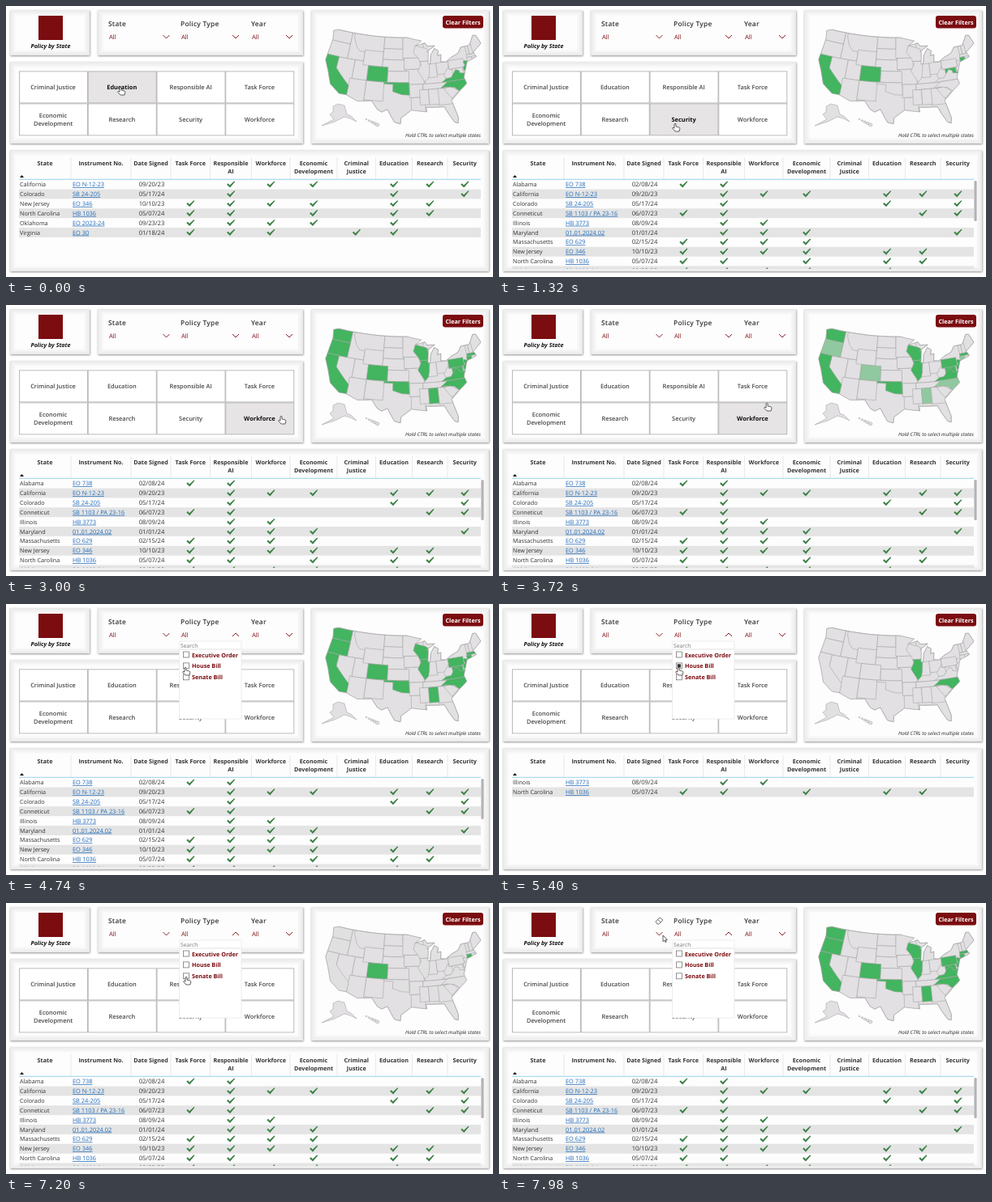
These frames come from a looping animation (600 px wide and 335 px high, 8000 ms). An HTML page:

```html
<!DOCTYPE html>
<html lang="en">
<head>
<meta charset="utf-8">
<title>Policy by State</title>
<style>
html, body { margin: 0; width: 100%; height: 100%; overflow: hidden; background: #fff; }
svg { display: block; width: 600px; height: 335px; }
text { font-family: "Open Sans", "Noto Sans", sans-serif; text-rendering: geometricPrecision; white-space: pre; }
</style>
</head>
<body>
<svg id="stage" viewBox="0 0 600 335"></svg>
<script>
const LOOP = 8000, FADE = 400;
const RED = '#7b0c10', LAND = [226, 224, 226], GREEN = [67, 180, 95];
const stage = document.getElementById('stage');

function add(tag, attrs, parent = stage) {
  const node = document.createElementNS('http://www.w3.org/2000/svg', tag);
  for (const k in attrs) node.setAttribute(k, attrs[k]);
  parent.appendChild(node);
  return node;
}
const box = (x, y, width, height, attrs, parent) => add('rect', { x, y, width, height, ...attrs }, parent);
const path = (d, attrs, parent) => add('path', { d, fill: 'none', ...attrs }, parent);
function text(str, x, y, size, attrs, parent) {
  const node = add('text', { x, y, 'font-size': size, fill: '#333', ...attrs }, parent);
  node.textContent = str;
  return node;
}
const mid = { 'text-anchor': 'middle' };
const bold = { 'font-weight': 700 };
const show = (node, on) => node.setAttribute('display', on ? 'inline' : 'none');
const mix = (a, b, f) => a + (b - a) * f;

// ---- panels ----
const defs = add('defs', {});
const blur = add('filter', { id: 'soft', x: '-10%', y: '-10%', width: '120%', height: '120%' }, defs);
add('feGaussianBlur', { stdDeviation: 1.2 }, blur);
const rowClip = add('clipPath', { id: 'rows' }, defs);
box(14, 215, 576, 110, {}, rowClip);

function panel(x, y, r, b) {
  const w = r - x, h = b - y;
  box(x + 0.5, y + 1, w, h, { fill: '#909090', filter: 'url(#soft)' });
  for (let k = 0; k < 8; k++) {
    const v = 234 + k * 2.6;
    box(x + k, y + k, w - 2 * k, h - 2 * k, { fill: `rgb(${v},${v},${v})` });
  }
  box(x + 8, y + 8, w - 16, h - 16, { fill: '#fefdfe' });
}
panel(5, 5, 103, 61);
panel(113, 5, 366, 61);
panel(5, 69, 366, 170);
panel(376, 5, 595, 170);
panel(5, 178, 595, 328);

// ---- logo place and title ----
box(40, 12, 30, 30, { fill: RED });
text('Policy by State', 55, 51.7, 7.1, { ...mid, ...bold, 'font-style': 'italic', fill: '#111' });

// ---- slicers ----
const chevron = (x, dir) => `M${x - 4} ${38 - 2 * dir}L${x} ${38 + 2 * dir}L${x + 4} ${38 - 2 * dir}`;
const [, typeChevron] = [['State', 126, 197.5], ['Policy Type', 215, 283], ['Year', 302, 349]].map(([name, x, cx]) => {
  text(name, x, 25.4, 8.4, { 'font-weight': 600, 'letter-spacing': 0.25 });
  text('All', x + 1, 41, 7.6, { fill: RED });
  return path(chevron(cx, 1), { stroke: RED, 'stroke-width': 0.9 });
});
const eraser = path('M193 23L198 18L202 21L197 26H195ZM195.5 20.5L199.5 24', { stroke: '#555', 'stroke-width': 0.8 });

// ---- topic tiles ----
const tiles = ['Criminal Justice', 'Education', 'Responsible AI', 'Task Force',
  'Economic Development', 'Research', 'Security', 'Workforce'].map((name, i) => {
  const x = 16 + (i % 4) * 84.8, y = i < 4 ? 80.5 : 120.5;
  const back = box(x + 0.4, y + 0.4, 84, 39, { stroke: '#aaa', 'stroke-width': 0.8 });
  const lines = name.startsWith('Eco') ? name.split(' ') : [name];
  const labels = lines.map((s, k) =>
    text(s, x + 42, y + 22.4 + (k - (lines.length - 1) / 2) * 9.6, 7.45, mid));
  return { x, y, back, labels };
});

// ---- map: conic projection, points as west longitude, latitude ----
const rad = Math.PI / 180;
const s1 = Math.sin(29.5 * rad), s2 = Math.sin(45.5 * rad);
const cone = (s1 + s2) / 2, C = 1 - s1 * s1 + 2 * cone * s1;
const rho = lat => Math.sqrt(C - 2 * cone * Math.sin(lat * rad)) / cone;
function project(lon, lat) {
  const a = cone * (96 - lon) * rad, r = rho(lat);
  return [491.5 + 265 * r * Math.sin(a), 92.5 - 265 * (rho(37.5) - r * Math.cos(0.93 * a))];
}
// closed shape, long sides follow the curve of the parallels
function trace(p) {
  const out = [], n = p.length;
  for (let i = 0; i < n; i += 2) {
    const lon = p[(i + 2) % n], lat = p[(i + 3) % n];
    const steps = Math.ceil(Math.abs(lon - p[i]) / 2) || 1;
    for (let k = 0; k < steps; k++)
      out.push(project(mix(p[i], lon, k / steps), mix(p[i + 1], lat, k / steps)).map(v => v.toFixed(1)).join(' '));
  }
  return 'M' + out.join('L') + 'Z';
}

const coast = trace([124.7, 48.4, 122.8, 49, 95.2, 49, 89.6, 48, 92, 46.7, 88.2, 47.4, 87.5, 46.5, 84.5, 46.4,
  87.8, 45, 87.2, 45, 87.7, 41.7, 86.9, 41.7, 86.4, 44, 84.8, 45.7, 83.4, 45, 83.9, 43.7, 82.6, 43.9, 83, 42,
  81.2, 41.8, 79, 42.8, 76.2, 43.6, 74.8, 45, 71.5, 45, 69.2, 47.4, 68, 47.2, 67, 44.8, 70.7, 43, 70, 41.7,
  73.7, 40.9, 74, 40.5, 75, 38.8, 76, 37, 75.5, 35.3, 77.9, 33.9, 81.3, 31.5, 80.1, 26.8, 80.4, 25.2, 81.4, 25.6,
  82.8, 28, 83.8, 30, 89.5, 30.3, 89.3, 29.1, 94, 29.7, 97.2, 27.6, 97.3, 26, 99.1, 26.4, 101.4, 29.8,
  103.1, 29, 104.5, 29.6, 106.5, 31.8, 111, 31.3, 114.8, 32.5, 117.1, 32.5, 120.6, 34.5, 122.5, 37.8, 124.4, 40.4, 124, 46.2]);
const edge = { stroke: '#a6a6a6', 'stroke-width': 0.6, 'stroke-linejoin': 'round' };
const land = { ...edge, fill: `rgb(${LAND})` };
path(coast, {}, add('clipPath', { id: 'coast' }, defs));
path(coast, land);
const inland = add('g', { 'clip-path': 'url(#coast)' });

// the coast trims every state and later states cover earlier ones
const shapes = {};
const state = (name, ...p) => { shapes[name] = path(trace(p), land, inland); };
const quad = (name, west, east, top, low) => state(name, west, top, east, top, east, low, west, low);

quad('Idaho', 117, 111, 49, 42);
state('Montana', 116, 49, 104, 49, 104, 45, 111, 44.5, 113, 44.5, 114.5, 45.6, 116, 48);
quad('Nevada', 120, 114, 42, 35);
quad('Utah', 114, 109, 42, 37);
quad('Arizona', 114.7, 109, 37, 31);
quad('New Mexico', 109, 103, 37, 31.9);
quad('Wyoming', 111, 104, 45, 41);
quad('North Dakota', 104, 96.8, 49, 45.9);
quad('South Dakota', 104, 96.5, 45.9, 43);
quad('Nebraska', 104, 95.8, 43, 40);
quad('Minnesota', 96.8, 89, 49, 43.5);
quad('Iowa', 96.3, 90.5, 43.5, 40.5);
quad('Missouri', 95.5, 89.5, 40.5, 36.5);
quad('Kansas', 102, 94.6, 40, 37);
quad('Arkansas', 94.5, 90, 36.5, 33);
quad('Louisiana', 94, 89.6, 33, 29);
quad('Mississippi', 91.2, 88.3, 35, 31);
quad('Kentucky', 89.3, 82, 38.9, 36.5);
quad('Tennessee', 90, 82, 36.5, 35);
quad('Indiana', 88, 84.8, 41.7, 38.1);
quad('Ohio', 84.8, 80.5, 41.8, 38.7);
quad('Georgia', 85.5, 81, 35, 30.6);
state('South Carolina', 83.3, 34.8, 81, 35.2, 78.5, 33.8, 81, 32);
state('West Virginia', 82.6, 38.4, 80.6, 40.5, 80.5, 39.7, 77.8, 39.5, 80.3, 37.4, 82, 37.4);
quad('Vermont', 73.3, 72.2, 45, 42.7);
quad('New Hampshire', 72.2, 70.9, 45.2, 42.7);
quad('Washington', 125, 117, 49, 45.9);
quad('Oregon', 125, 117, 45.9, 42);
state('California', 125, 42, 120, 42, 120, 39, 114.6, 35, 114.7, 32, 125, 32);
quad('Colorado', 109, 102, 41, 37);
state('Oklahoma', 103, 37, 94.6, 37, 94.5, 33.7, 97, 33.8, 100, 34.6, 100, 36.5, 103, 36.5);
state('Wisconsin', 92, 46.8, 88.1, 45.9, 86.5, 45, 87, 42.5, 90.6, 42.5, 91.2, 43.5, 92.8, 45);
state('Illinois', 90.6, 42.5, 87, 42.5, 87.5, 39.3, 88, 37.9, 89.2, 37, 91.4, 40, 90.2, 41.8);
quad('Alabama', 88.3, 85.2, 35, 30.9);
quad('Pennsylvania', 80.5, 75, 42, 39.7);
quad('Massachusetts', 73.4, 69, 42.7, 42);
quad('Conneticut', 73.6, 71.8, 42, 40.5);
quad('Maryland', 79.5, 75, 39.7, 38);
quad('Delaware', 75.8, 75, 39.8, 38.5);
state('New Jersey', 74.7, 41.4, 73.5, 41, 73.5, 39, 75.5, 38.8, 75.5, 39.6, 74.7, 40.2, 75.1, 40.9);
state('Virginia', 83.6, 36.55, 75, 36.55, 75, 38, 77.1, 38.4, 77.1, 39, 78.3, 39.4, 80.3, 37.5, 82, 37.4);
state('North Carolina', 84.3, 35, 81.7, 36.55, 75, 36.55, 75, 33, 78.5, 33.8, 79.7, 34.8, 82.3, 35.2);
path(coast, edge);

// Alaska and Hawaii
path('M403 124L409 121L417 123L420 134L425 136L432 143L424 139L417 137L405 143L389 148L404 140L399 134L403 131Z', land);
for (let k = 0; k < 5; k++)
  add('ellipse', { cx: 444 + k * 3.4, cy: 140 + k * 1.7, rx: 0.9 + k * 0.35, ry: 0.7 + k * 0.3, ...land });

box(538, 12, 50, 15.5, { rx: 3, fill: RED });
text('Clear Filters', 563, 22.5, 7.2, { ...mid, ...bold, fill: '#fff' });
text('Hold CTRL to select multiple states', 538.5, 162, 6.2, { ...mid, 'font-style': 'italic', fill: '#222' });

// ---- table ----
const heads = ['State', 'Instrument No.', 'Date Signed', 'Task Force', 'Responsible AI', 'Workforce',
  'Economic Development', 'Criminal Justice', 'Education', 'Research', 'Security'];
const edges = [16, 80, 154, 203, 251.5, 302.5, 350, 408, 455.5, 500.5, 544, 586.5];
const center = i => (edges[i] + edges[i + 1]) / 2;
const topicsList = heads.slice(3);
const records = [
  ['Alabama', 'EO 738', '02/08/24', '01'],
  ['California', 'EO N-12-23', '09/20/23', '123567'],
  ['Colorado', 'SB 24-205', '05/17/24', '157'],
  ['Conneticut', 'SB 1103 / PA 23-16', '06/07/23', '0167'],
  ['Illinois', 'HB 3773', '08/09/24', '12'],
  ['Maryland', '01.01.2024.02', '01/01/24', '1237'],
  ['Massachusetts', 'EO 629', '02/15/24', '0123'],
  ['New Jersey', 'EO 346', '10/10/23', '012356'],
  ['North Carolina', 'HB 1036', '05/07/24', '01356'],
  ['Oklahoma', 'EO 2023-24', '09/23/23', '01235'],
  ['Oregon', 'EO 23-26', '11/28/23', '01'],
  ['Pennsylvania', 'EO 2023-19', '09/20/23', '012'],
  ['Virginia', 'EO 30', '01/18/24', '01245'],
  ['Washington', 'EO 24-01', '01/30/24', '012'],
  ['Wisconsin', 'EO 211', '08/23/23', '02']
];
function matches([, bill, , topics], filter) {
  const col = topicsList.indexOf(filter);
  return col < 0 ? bill.startsWith(filter) || !filter : topics.includes(col);
}

heads.forEach((name, i) => {
  const wrap = ['AI', 'Development', 'Justice'].includes(name.split(' ')[1]) ? name.split(' ') : [name];
  wrap.forEach((s, k) => text(s, center(i), 197 + k * 9.8, 7.2, { ...mid, ...bold }));
  if (i) path(`M${edges[i]} 187V214`, { stroke: '#dcdcdc', 'stroke-width': 0.6 });
});
path('M17 212L19.5 209L22 212Z', { fill: '#111' });

const views = {};
function buildRows(filter) {
  const g = add('g', { 'clip-path': 'url(#rows)' });
  const list = records.filter(r => matches(r, filter));
  list.forEach(([name, bill, date, topics], i) => {
    const y = 214.7 + i * 11.87, base = y + 8.5;
    if (i % 2) box(16, y, 569, 11.87, { fill: '#e4e4e4' }, g);
    text(name, 17, base, 7.2, {}, g);
    text(bill, 82, base, 7.4, { fill: '#1f6bb8', 'text-decoration': 'underline' }, g);
    text(date, 179.5, base, 7.6, mid, g);
    for (const c of topics)
      path('M-5 .3L-3.2 -1.1L-1.3 1.2L4.2 -4L5.2 -3.2L-1 4.2Z',
        { fill: '#3c8045', transform: `translate(${center(+c + 3)} ${y + 5.7})` }, g);
  });
  if (list.length > 9) box(585.4, 216, 3.2, 50, { rx: 1.5, fill: '#b3b3b3' }, g);
  views[filter] = g;
}

// ---- timeline: filter, pressed, released, pointer place ----
const stops = [
  ['Education', -1000, 120, 141, 100],
  ['Security', 600, 1320, 217, 145],
  ['Research', 1680, 2340, 160, 141],
  ['Workforce', 3060, 3540, 339, 137],
  ['', 4200, 4260, 283, 36],
  ['HB', 4860, 5940, 221, 78],
  ['SB', 6360, 7140, 222, 91],
  ['', 8040, 8100, 202, 40]
];
const MENU_OPEN = 4200;
new Set(stops.map(s => s[0])).forEach(buildRows);
path('M16 214.3H585', { stroke: '#8fcdec', 'stroke-width': 0.9 });

// ---- policy type list ----
const menu = add('g', {});
box(213.5, 46, 76.5, 96, { fill: '#fff', stroke: '#e6e6e6', 'stroke-width': 0.7 }, menu);
text('Search', 215, 53.6, 6.8, { fill: '#777' }, menu);
path('M214 56H289', { stroke: '#d5d5d5', 'stroke-width': 0.7 }, menu);
const checks = {};
[['Executive Order', 'EO'], ['House Bill', 'HB'], ['Senate Bill', 'SB']].forEach(([name, key], i) => {
  const y = 59 + i * 13.9;
  box(218.4, y, 7, 7, { fill: '#fff', stroke: '#777', 'stroke-width': 0.8 }, menu);
  checks[key] = box(219.8, y + 1.4, 4.2, 4.2, { fill: '#333' }, menu);
  text(name, 229, y + 6.5, 7.2, { ...bold, fill: RED }, menu);
});

// ---- pointers ----
const ink = { fill: '#fff', stroke: '#222', 'stroke-width': 0.7, 'stroke-linejoin': 'round' };
const hand = path('M-1 1Q0 -.8 1 1V4L5 5Q6 5.3 5.8 6.6L5 10H0L-3.4 6.4Q-3.2 5-2 5.4L-1 6.2Z', ink);
const arrow = path('M0 0V7.6L1.8 6L3 8.6L4.2 8L3.1 5.6H5.4Z', ink);

const events = stops.flatMap(([f, on, off]) => [[on, f], [off, '']]);
const eventAt = t => events.findLastIndex(e => e[0] <= t);
function pointerAt(t) {
  const i = Math.max(1, stops.findIndex(s => s[2] + 60 > t));
  const [, , off, x0, y0] = stops[i - 1], [, on, , x1, y1] = stops[i];
  const leave = off + 60, arrive = on - 120;
  const u = Math.min(1, Math.max(0, (t - leave) / (arrive - leave)));
  const e = u * u * (3 - 2 * u);
  return [mix(x0, x1, e), mix(y0, y1, e)];
}

function draw(t) {
  const filter = events[eventAt(t)][1];
  const [x, y] = pointerAt(t);
  const open = t >= MENU_OPEN;

  for (const key in views) show(views[key], key === filter);

  // the map follows the table a moment later
  const i = eventAt(t - 60);
  const u = Math.min(1, (t - 60 - events[i][0]) / FADE), p = 1 - (1 - u) * (1 - u);
  const from = i ? events[i - 1][1] : '', to = events[i][1];
  for (const r of records) {
    const level = mix(+matches(r, from), +matches(r, to), p);
    shapes[r[0]].setAttribute('fill', `rgb(${LAND.map((v, k) => mix(v, GREEN[k], level))})`);
  }

  for (const tile of tiles) {
    const over = !open && x > tile.x && x < tile.x + 84.8 && y + 2 > tile.y && y + 2 < tile.y + 40;
    tile.back.setAttribute('fill', over ? '#e6e4e5' : '#fff');
    for (const l of tile.labels) {
      l.setAttribute('fill', over ? '#111' : '#484848');
      l.setAttribute('font-weight', over ? 700 : 600);
    }
  }

  show(menu, open);
  for (const key in checks) show(checks[key], key === filter);
  typeChevron.setAttribute('d', chevron(283, open ? -1 : 1));
  show(eraser, t >= 7950);

  const onLink = y > 56;
  show(hand, onLink);
  show(arrow, !onLink);
  (onLink ? hand : arrow).setAttribute('transform', `translate(${x} ${y})`);
}

const start = performance.now();
function tick() {
  draw((performance.now() - start) % LOOP);
  requestAnimationFrame(tick);
}
draw(0);
requestAnimationFrame(tick);
</script>
</body>
</html>
```
